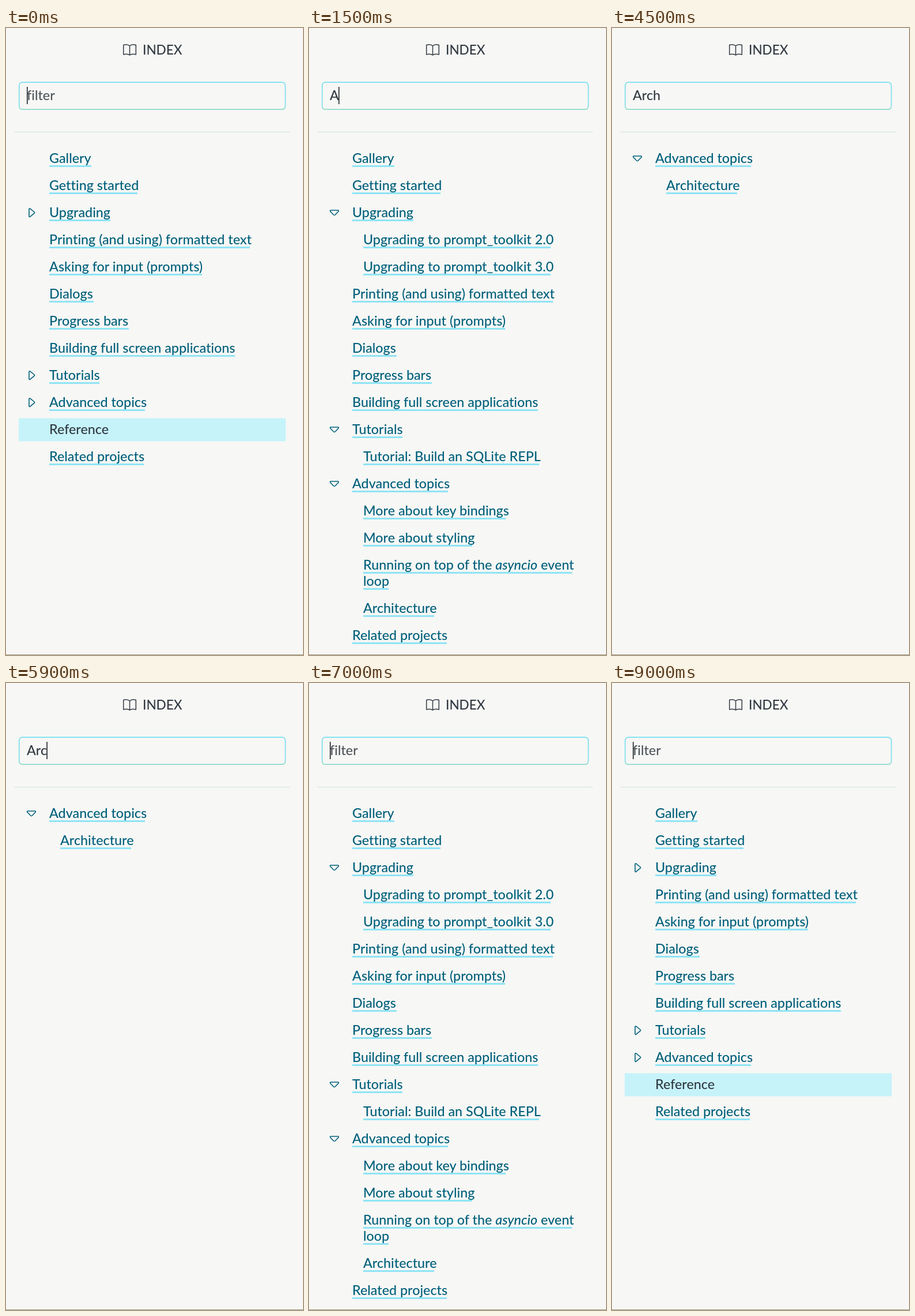
These frames come from a looping animation (515x1087 px, 9.1 s). An HTML page:

```html
<!DOCTYPE html>
<html lang="en">
<head>
<meta charset="utf-8">
<title>Index filter</title>
<style>
  html, body { margin: 0; width: 100%; height: 100%; overflow: hidden; background: #f7f7f5; }
  svg { display: block; width: 515px; height: 1087px; }
  text {
    font: 500 23.3px Lato, "Open Sans", sans-serif;
    font-variant-ligatures: none;
    fill: #00607b;
    white-space: pre;
  }
  .dark { fill: #323a43; }
  .heading { font-size: 22.5px; }
  .icon { fill: none; stroke: #00607b; stroke-width: 1.6; stroke-linejoin: round; }
</style>
</head>
<body>
<svg viewBox="0 0 515 1087" xmlns="http://www.w3.org/2000/svg">
  <defs>
    <linearGradient id="edge" x2="0" y2="1">
      <stop offset="0" stop-color="#78dff0"/>
      <stop offset=".8" stop-color="#82dfec"/>
      <stop offset="1" stop-color="#8cdccb"/>
    </linearGradient>
  </defs>
  <rect width="515" height="1087" fill="#f7f7f5"/>
  <path d="M214.5 31 C212 28.5 207 28.5 203.7 29.5 V46 C207 45 212 45 214.5 47 C217 45 222 45 225.3 46 V29.5 C222 28.5 217 28.5 214.5 31 V47"
        fill="none" stroke="#323a43" stroke-width="1.5" stroke-linejoin="round"/>
  <text class="dark heading" x="237" y="46">INDEX</text>
  <rect x="22.8" y="94.2" width="461.6" height="47" rx="5.5" fill="none" stroke="url(#edge)" stroke-width="1.7"/>
  <text id="query" class="dark" x="36" y="125"></text>
  <rect id="caret" y="102" width="1.6" height="30" fill="#20252a"/>
  <path d="M15 180.5 H492" stroke="#cfe2e0"/>
  <g id="list"></g>
  <path d="M0 1086.5 H515" stroke="#98987a"/>
</svg>
<script>
const LOOP = 9100;
const ROW = 47, WRAPPED_LINE = 28, FIRST_BASELINE = 234;

// Each line is [markup, underline width].
const item = (lines, children = [], current = false) => ({ lines, children, current });
const leaf = (label, width) => item([[label, width]]);

const pages = [
  leaf("Gallery", 73),
  leaf("Getting started", 153),
  item([["Upgrading", 106]], [
    leaf("Upgrading to prompt_toolkit 2.0", 325),
    leaf("Upgrading to prompt_toolkit 3.0", 325)
  ]),
  leaf("Printing (and using) formatted text", 348),
  leaf("Asking for input (prompts)", 265),
  leaf("Dialogs", 77),
  leaf("Progress bars", 138),
  leaf("Building full screen applications", 322),
  item([["Tutorials", 87]], [leaf("Tutorial: Build an SQLite REPL", 305)]),
  item([["Advanced topics", 166]], [
    leaf("More about key bindings", 247),
    leaf("More about styling", 189),
    item([['Running on top of the <tspan font-style="italic">asyncio</tspan> event', 362], ["loop", 44]]),
    leaf("Architecture", 123)
  ]),
  item([["Reference", 0]], [], true),
  leaf("Related projects", 164)
];

const typed = [[0, ""], [1300, "A"], [2200, "Ar"], [3100, "Arc"], [3200, "Arch"],
               [5900, "Arc"], [6000, "Ar"], [6100, "A"], [7000, ""]];
const filtered = [[0, ""], [1400, "a"], [2400, "ar"], [3300, "arc"],
                  [6100, "ar"], [6700, "a"], [7100, ""]];
const caretOn = [[0, true], [100, false], [600, true], [1100, false], [1300, true],
                 [1800, false], [2200, true], [2700, false], [3100, true], [3600, false],
                 [4000, true], [4500, false], [5000, true], [5500, false], [5900, true],
                 [6500, false], [7000, true], [7500, false], [8000, true], [8500, false], [9000, true]];

const valueAt = (track, t) => track.findLast(([start]) => start <= t)[1];
const byId = id => document.getElementById(id);
const query = byId("query"), caret = byId("caret"), list = byId("list");

const matches = (entry, filter) =>
  entry.lines.some(([label]) => label.toLowerCase().includes(filter));

function arrow(y, open) {
  const d = open
    ? `M37.5 ${y - 4} H50.5 Q52 ${y - 3.5} 51 ${y - 2} L45.2 ${y + 4} Q44 ${y + 5} 42.8 ${y + 4} L37 ${y - 2} Q36 ${y - 3.5} 37.5 ${y - 4} Z`
    : `M40 ${y - 6} Q40.3 ${y - 7.5} 41.8 ${y - 6.8} L49 ${y - 1} Q50.2 ${y} 49 ${y + 1.2} L41.8 ${y + 7.2} Q40.3 ${y + 8} 40 ${y + 6.4} Z`;
  return `<path class="icon" d="${d}"/>`;
}

function listMarkup(filter) {
  let y = FIRST_BASELINE, markup = "";
  const addEntry = (entry, x) => {
    if (entry.current) markup += `<rect x="22" y="${y - 27.5}" width="463" height="40" fill="#c6f3fa"/>`;
    entry.lines.forEach(([label, width], i) => {
      if (i) y += WRAPPED_LINE;
      if (width) markup += `<rect x="${x}" y="${y + 4}" width="${width}" height="3" fill="#8fe4f5"/>`;
      markup += `<text x="${x}" y="${y}"${entry.current ? ' class="dark"' : ""}>${label}</text>`;
    });
    y += ROW;
  };
  for (const page of pages) {
    const children = page.children.filter(child => matches(child, filter));
    if (!matches(page, filter) && !children.length) continue;
    if (page.children.length) markup += arrow(y - 8, filter !== "");
    addEntry(page, 75);
    if (filter) children.forEach(child => addEntry(child, 94));
  }
  return markup;
}

let shownFilter;
function draw(t) {
  const text = valueAt(typed, t), filter = valueAt(filtered, t);
  query.textContent = text || "filter";
  query.style.fill = text ? "#323a43" : "#50565c";
  caret.setAttribute("x", text ? 35.2 + query.getComputedTextLength() : 36);
  caret.setAttribute("visibility", valueAt(caretOn, t) ? "visible" : "hidden");
  if (filter !== shownFilter) {
    list.innerHTML = listMarkup(filter);
    shownFilter = filter;
  }
}

const start = performance.now();
function tick() {
  draw((performance.now() - start) % LOOP);
  requestAnimationFrame(tick);
}
tick();
</script>
</body>
</html>
```
